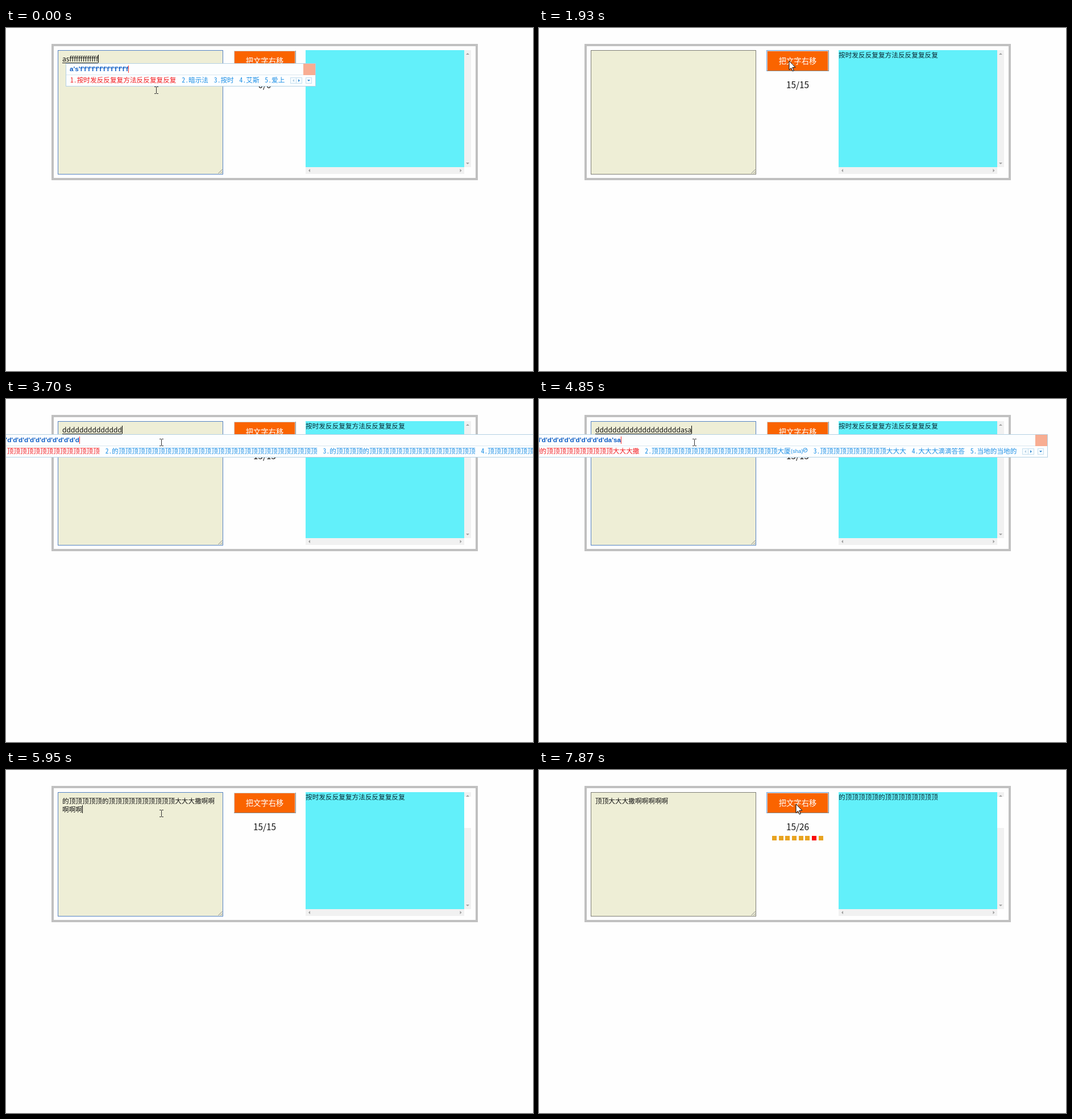
An HTML page with a canvas that plays this animation: 927 px wide and 604 px high, repeating every 8000 ms.

```html
<!DOCTYPE html>
<html lang="zh-CN">
<head>
<meta charset="utf-8">
<title>文字右移</title>
<style>
html, body { margin: 0; width: 100%; height: 100%; overflow: hidden; background: #fefefe; }
canvas { display: block; }
</style>
</head>
<body>
<canvas id="stage" width="927" height="604"></canvas>
<script>
const ctx = document.getElementById('stage').getContext('2d');
const LOOP = 8000, EM = 11.66;
const CJK = '"Noto Sans CJK SC", "Noto Sans CJK", sans-serif';
const LATIN = '"Liberation Sans", sans-serif';

const ding = n => '顶'.repeat(n);
const FIRST = '按时发反反复复方法反反复复反复';
const SECOND = `的${ding(5)}的${ding(10)}大大大撒啊啊啊啊啊`;

// Pointer positions: [time, x, y]
const POINTER = [
  [0, 264, 109], [400, 318, 95], [530, 372, 80], [660, 418, 68], [800, 440, 58],
  [2240, 404, 66], [2370, 322, 73], [2510, 273, 76],
  [6070, 316, 73], [6190, 372, 69], [6310, 418, 64], [6430, 444, 61], [6550, 452, 60]
];

// Input method window: [time, text start, caret, typed syllables, candidates]
const ds = n => Array(n).fill('d');
const tail = n => [...ds(19), 'da', 'sa', ...Array(n).fill('a')];
const long = SECOND.slice(0, 21);
const lookup = (n, start) => {
  const more = ['啊'.repeat(n), ding(19) + '大厦' + '啊'.repeat(n), ding(10) + '大大大' + '啊'.repeat(n)];
  return [start, -80, 144 + 9.5 * n, tail(n),
    [long + more[0], more[1], more[2], '大大大滴滴答答', '当地的当地的']];
};
const POPUPS = [
  [0, 113, 215, ['a', 's', ...Array(13).fill('f')], [FIRST, '暗示法', '按时', '艾斯', '爱上']],
  [250],
  [3030, 114, 122, ds(1), ['的', '点', '到', '大', 'の']],
  [3430, 114, 172, ds(6), [ding(6), '的' + ding(5), ding(3), '等等', '的']],
  [3560, 31, 130, ds(10), [ding(10), '的' + ding(19), '的' + ding(14), ding(9), '等等']],
  [3700, -10, 129, ds(14), [ding(14), '的' + ding(30), '的' + ding(4) + '的' + ding(16), ding(14), '等等']],
  [3850, -57, 123, ds(18), [ding(18), '的' + ding(30), '的' + ding(4) + '的' + ding(18), ding(18), '等等']],
  [4010, -80, 121, ds(20), [ding(20), '的' + ding(19), ding(13), '大大滴滴答答', '当地的当地的的']],
  [4280, -80, 137, [...ds(19), 'da', 's'], [long.slice(0, 20) + '是', ding(19) + '大树', ding(10) + '大大是', '大大大滴滴答答', '当地的当地的']],
  [4850, -80, 144, tail(0), [long, ding(19) + '大厦(sha)', ding(10) + '大大大', '大大大滴滴答答', '当地的当地的']],
  lookup(2, 5250), lookup(3, 5380), lookup(5, 5510),
  [5950]
];

const latest = (list, t) => list.filter(row => row[0] <= t).pop();
const moved = (t, start, pitch, first, step) =>
  t < start ? 0 : Math.min(15, Math.floor(first + step * Math.floor((t - start) / pitch)));

function box(x, y, w, h, color) {
  ctx.fillStyle = color;
  ctx.fillRect(x, y, w, h);
}

function framed(x, y, w, h, line, border, fill) {
  box(x, y, w, h, border);
  box(x + line, y + line, w - 2 * line, h - 2 * line, fill);
}

function shape(color, ...points) {
  ctx.fillStyle = color;
  ctx.beginPath();
  points.forEach(([x, y]) => ctx.lineTo(x, y));
  ctx.closePath();
  ctx.fill();
}

// Small triangle pointing along (dx, dy)
function triangle(x, y, dx, dy, size, color) {
  const tip = size / 2;
  shape(color, [x + dx * tip, y + dy * tip],
    [x - dx * tip + dy * size, y - dy * tip + dx * size],
    [x - dx * tip - dy * size, y - dy * tip - dx * size]);
}

function label(text, x, y, size, color = '#111', align = 'left', family = CJK, weight = 400) {
  ctx.font = `${weight} ${size}px ${family}`;
  ctx.fillStyle = color;
  ctx.textAlign = align;
  ctx.fillText(text, x, y);
  return ctx.measureText(text).width;
}

function drawTextarea(focused, text, composing) {
  framed(91, 39, 291, 219, 1, focused ? '#5583c4' : '#7d7d76', '#eeeed6');
  ctx.strokeStyle = '#888';
  ctx.lineWidth = 1;
  ctx.beginPath();
  for (const d of [3, 7]) {
    ctx.moveTo(380.5 - d, 256);
    ctx.lineTo(380.5, 256 - d);
  }
  ctx.stroke();

  let width = 0, row = 0;
  if (composing) {
    width = label(text, 99, 59, 12.1);
    box(99, 61, width, 1, '#222');
  } else {
    row = text.length > 23 ? 1 : 0;
    label(text.slice(0, 23), 99, 59, EM);
    width = label(text.slice(23), 99, 73.5, EM) || (row ? 0 : text.length * EM);
  }
  if (focused) box(Math.round(99 + width), 47 + row * 15, 1, 14, '#000');
}

function drawButton(focused, pressed) {
  if (focused) box(400, 39, 110, 37, '#78a8e0');
  const [light, dark] = ['#d4d4d4', '#858585'];
  box(401, 40, 109, 36, pressed ? light : dark);
  box(401, 40, 108, 35, pressed ? '#7189ab' : light);
  box(402, 41, 106, 34, '#fa6400');
  label('把文字右移', 455, 62.5, 13.3, '#fff', 'center');
}

function drawOutput(text, erased) {
  box(527, 39, 279, 206, '#62f0fa');
  box(806, 39, 12, 206, '#f1f1f1');
  box(527, 245, 279, 12, '#f1f1f1');
  if (erased) box(806, 47, 12, 55, '#fefefe');
  const grey = '#a0a0a0';
  triangle(812, 45.5, 0, -1, 3, grey);
  triangle(812, 238.5, 0, 1, 3, grey);
  triangle(533.5, 251, -1, 0, 3, grey);
  triangle(800, 251, 1, 0, 3, grey);
  label(text, 527, 51.5, EM, '#0b2a33');
}

function drawCandidate(item, index, x) {
  const color = index ? '#1c8fe6' : '#f5191d';
  const [word, note] = item.split('(');
  label(`${index + 1}.`, x, 96, EM, color, 'left', '"Noto Sans Mono CJK SC", "Liberation Mono", monospace');
  x += EM;
  label(word, x, 96, EM, color);
  x += word.length * EM;
  if (note) {
    label('(' + note, x, 95, 9.5, color, 'left', LATIN);
    ctx.strokeStyle = color;
    ctx.lineWidth = 1;
    ctx.beginPath();
    ctx.arc(x + 25.5, 90, 3.5, 0, 7);
    ctx.moveTo(x + 23, 91);
    ctx.lineTo(x + 28, 88);
    ctx.stroke();
    x += 30;
  }
  return x + 9.8;
}

function drawPopup(start, caret, syllables, items) {
  const left = start - 8;
  const width = items.reduce((w, s) => w + (s.split('(')[0].length + 1) * EM + 9.8 + (s.includes('(') ? 30 : 0), 0);
  const end = Math.round(start + width), right = end + 45;
  framed(left, 62, right - left, 41, 1, '#b4d1e3', '#fcfeff');
  box(left + 1, 82, right - left - 2, 1, '#dbe8f0');
  label(syllables.join("'"), caret, 76, 11.75, '#0b5cc4', 'right', LATIN, 700);
  box(caret, 66, 1, 13, '#f33');

  let x = start;
  items.forEach((item, i) => { x = drawCandidate(item, i, x); });
  for (const dx of [0, 10, 27]) framed(end + dx, 87, 11, 11, 1, '#c6dfef', '#f7fcff');
  triangle(end + 5.5, 92.5, -1, 0, 2.5, '#a9c6dc');
  triangle(end + 15.5, 92.5, 1, 0, 2.5, '#1878c8');
  triangle(end + 32.5, 92.5, 0, 1, 2.5, '#1878c8');
  box(right - 22, 63, 21, 20, '#f8ad92');
}

function drawPointer(x, y) {
  if (x < 382) {
    box(x, y - 5, 1, 11, '#333');
    for (const edge of [y - 6, y + 6]) {
      box(x - 3, edge, 3, 1, '#333');
      box(x + 1, edge, 3, 1, '#333');
    }
    return;
  }
  const arrow = [[0, 0], [0, 15.5], [3.5, 12.3], [6, 18], [8.3, 17], [5.8, 11.5], [10.8, 11.2]]
    .map(([dx, dy]) => [x + dx, y + dy]);
  shape('#fff', ...arrow);
  ctx.strokeStyle = '#000';
  ctx.lineWidth = 1;
  ctx.stroke();
}

function draw(t) {
  const popup = latest(POPUPS, t);
  const composing = popup.length > 1;
  const first = moved(t, 1350, 145, 3, 3);
  const second = moved(t, 7190, 136, 1.4, 2.73);
  const buttonFocus = (t >= 1070 && t < 2510) || t >= 6920;
  const pressed = (t >= 1070 && t < 1200) || (t >= 6920 && t < 7055);
  const input = composing ? popup[3].join('') : t < 3000 ? FIRST.slice(first) : SECOND.slice(second);

  box(0, 0, 927, 604, '#fefefe');
  framed(80, 28, 750, 240, 4, '#c0c0c0', '#fefefe');
  drawTextarea(!buttonFocus, input, composing);
  drawButton(buttonFocus, pressed);
  drawOutput(second ? SECOND.slice(0, second) : FIRST.slice(0, first), t >= 5950);

  const counter = second ? `${second}/26` : first ? `${first}/15` : '0/0';
  label(counter, 455, 105.5, 15.3, '#111', 'center');
  const count = second || first;
  if (second || (first && first < 15)) {
    for (let i = 0; i < 8; i++) {
      box(Math.round(410 + i * EM), 116, 8, 8, i === (count - 1) % 8 ? '#fa0808' : '#e8a320');
    }
  }
  if (composing) drawPopup(...popup.slice(1));
  drawPointer(...latest(POINTER, t).slice(1));
}

const began = performance.now();
function tick() {
  draw((performance.now() - began) % LOOP);
  requestAnimationFrame(tick);
}
tick();
</script>
</body>
</html>
```
